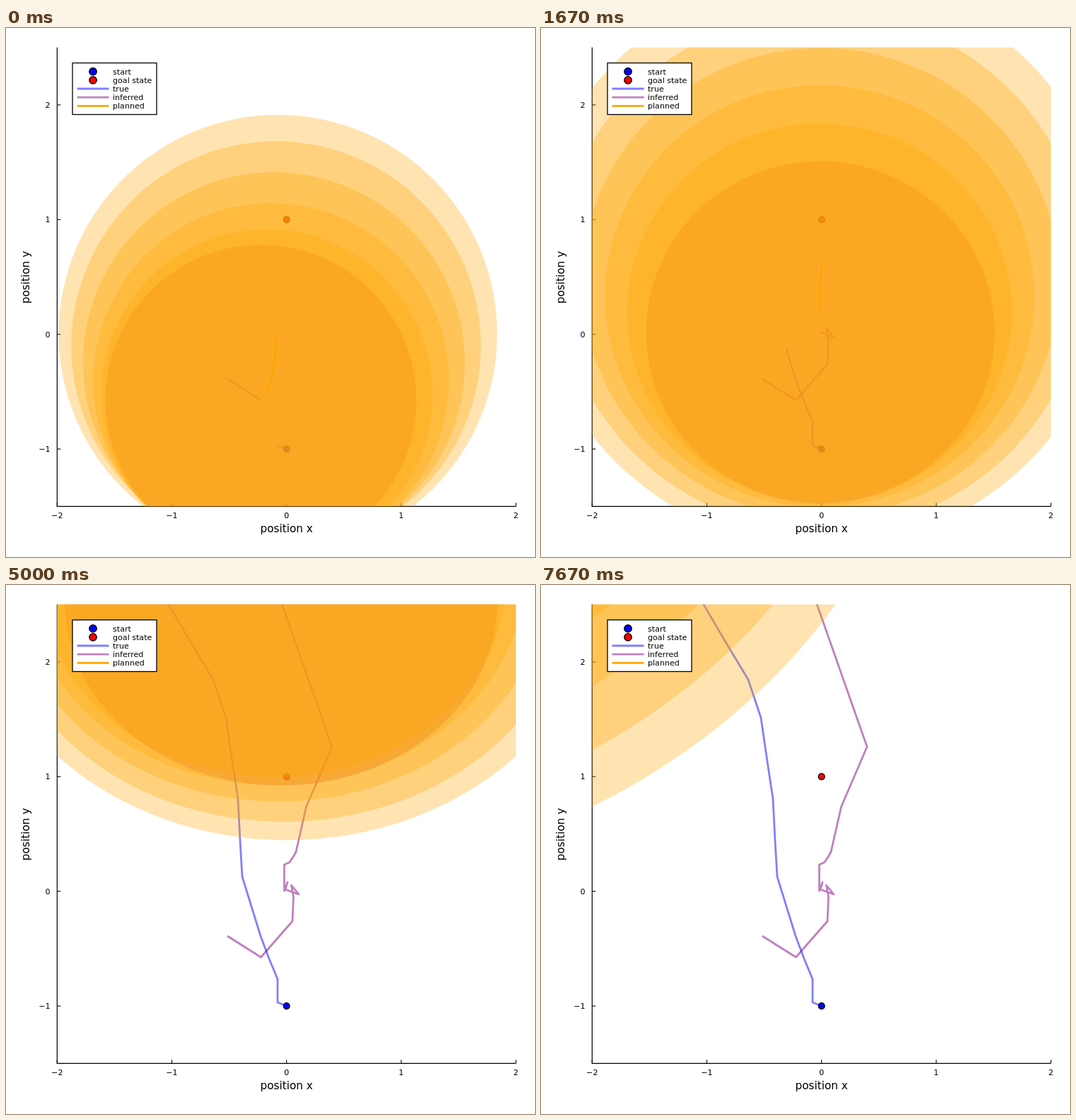
An HTML page with a canvas that plays this animation: 748 by 749 pixels, repeating every 8 s.

```html
<!DOCTYPE html>
<html>
<head>
<meta charset="utf-8">
<style>
html, body { margin: 0; width: 100%; height: 100%; overflow: hidden; background: #fff; }
canvas { display: block; }
</style>
</head>
<body>
<canvas id="stage" width="748" height="749"></canvas>
<script>
const ctx = document.getElementById('stage').getContext('2d');
const LEFT = 72.3, TOP = 27.5, RIGHT = 721, BOTTOM = 677.3;
const SMALL = 11.1, LARGE = 15.28, STEPS = 24, HORIZON = 5;
const BLUE = 'rgba(0,0,255,.5)', PURPLE = 'rgba(128,0,128,.5)', ORANGE = 'rgb(255,165,0)';
const px = x => 396.7 + 162.2 * x;
const py = y => 433.7 - 162.4 * y;
const mix = (a, b, u) => a + (b - a) * u;

const truePath = [
  [397, 596], [384, 591], [384, 578], [384, 558], [372, 529], [360, 497],
  [347, 455], [334, 413], [331, 362], [328, 303], [320, 250], [311, 188],
  [293, 134], [260, 79], [229, 26]
];
const inferredPath = [
  [313, 497], [360.5, 527], [405, 476], [406.5, 442], [403.5, 425], [414, 438],
  [395, 431], [398, 421], [395, 429], [393.5, 433], [393.5, 396], [401, 392.5],
  [406, 385], [410, 378], [424.5, 314], [461, 229], [389, 24], [235, -150], [110, -272]
];
// past its last point the inferred path drifts away at a steady speed
for (let i = inferredPath.length; i <= STEPS; i++) {
  const [x, y] = inferredPath[i - 1];
  inferredPath.push([x - 102, y - 48]);
}

// turning points of the plan: where it ends, its first heading, smallest and largest radius
const plans = [
  { step: 0, end: [384.5, 433], heading: [17, 0], radius: [220, 310] },
  { step: 3, end: [399, 329], heading: [-6, -57], radius: [209.5, 357] },
  { step: 8, end: [395, 334], heading: [0, -43], radius: [302, 490] },
  { step: 12, end: [402, 310], heading: [-2, -44], radius: [386, 556] },
  { step: 14, end: [400, 215], heading: [-20, -60], radius: [345, 520] },
  { step: 15, end: [397, -17], heading: [-28, -70], radius: [306, 445] },
  { step: 17, end: [125, -225], heading: [-25, -70], radius: [452, 535] },
  { step: 20, end: [-171, -386], heading: [0, 0], radius: [600, 767] },
  { step: 23, end: [-450, -377], heading: [15, 54], radius: [780, 1000] }
];

function planAt(step) {
  const i = plans.findLastIndex(p => p.step <= step);
  const a = plans[i], b = plans[i + 1] || a;
  const u = (step - a.step) / (b.step - a.step || 1);
  const blend = key => a[key].map((v, k) => mix(v, b[key][k], u));
  return { end: blend('end'), heading: blend('heading'), radius: blend('radius') };
}

// ring 0 is the inferred state, the others lie along a cubic curve to the plan's end
function ringsAt(step) {
  const { end, heading, radius } = planAt(step);
  const start = inferredPath[step + 1];
  const ratio = Math.max(.81, 1 - .15 * (step / 15) ** 2);
  return Array.from({ length: HORIZON + 1 }, (_, n) => {
    const t = n / HORIZON, s = 1 - t;
    const along = k => start[k] + 3 * s * s * t * heading[k]
      + (3 * s * t * t * .8 + t ** 3) * (end[k] - start[k]);
    const r = mix(radius[0], radius[1], t ** 1.15);
    return { x: along(0), y: along(1), rx: r, ry: r * ratio };
  });
}

function line(points, color, width = 2.78) {
  ctx.beginPath();
  points.forEach(p => ctx.lineTo(p[0], p[1]));
  ctx.strokeStyle = color;
  ctx.lineWidth = width;
  ctx.stroke();
}

function dot(x, y, r, color) {
  ctx.beginPath();
  ctx.arc(x, y, r, 0, 7);
  ctx.fillStyle = color;
  ctx.fill();
  ctx.strokeStyle = '#000';
  ctx.lineWidth = 1.4;
  ctx.stroke();
}

function text(str, x, y, size, align) {
  ctx.font = size + 'px "DejaVu Sans", sans-serif';
  ctx.textAlign = align;
  ctx.fillStyle = '#000';
  ctx.fillText(str, x, y);
}

function axes() {
  line([[LEFT, TOP], [LEFT, BOTTOM], [RIGHT, BOTTOM]], '#000', 1.2);
  for (let v = -2; v <= 2; v++) {
    const label = String(v).replace('-', '\u2212');
    line([[px(v), BOTTOM], [px(v), BOTTOM - 5]], '#000', 1.1);
    text(label, px(v), 694, SMALL, 'center');
    if (v < -1) continue;
    line([[LEFT, py(v)], [LEFT + 5, py(v)]], '#000', 1.1);
    text(label, 62.5, py(v) + 4, SMALL, 'right');
  }
  text('position x', 396.7, 714, LARGE, 'center');
  ctx.save();
  ctx.translate(33, 353);
  ctx.rotate(-Math.PI / 2);
  text('position y', 0, 0, LARGE, 'center');
  ctx.restore();
}

function legend() {
  ctx.fillStyle = '#fff';
  ctx.fillRect(94, 49.5, 119, 73);
  ctx.strokeStyle = '#000';
  ctx.lineWidth = 1.3;
  ctx.strokeRect(94, 49.5, 119, 73);
  const row = i => 61.7 + 12.15 * i;
  ['#00f', '#f00'].forEach((c, i) => dot(123, row(i), 5.2, c));
  [BLUE, PURPLE, ORANGE].forEach((c, i) =>
    line([[100.5, row(i + 2)], [145.5, row(i + 2)]], c));
  ['start', 'goal state', 'true', 'inferred', 'planned'].forEach((s, i) =>
    text(s, 151, row(i) + 4, SMALL, 'left'));
}

function draw(now) {
  // a small lead keeps rounded frame times on the right side of each step
  const step = Math.floor((now % 8000 + 4) * STEPS / 8000) % STEPS;
  const rings = ringsAt(step);
  ctx.fillStyle = '#fff';
  ctx.fillRect(0, 0, 748, 749);
  ctx.lineJoin = 'miter';
  axes();

  ctx.save();
  ctx.beginPath();
  ctx.rect(LEFT, TOP, RIGHT - LEFT, BOTTOM - TOP);
  ctx.clip();
  ctx.lineJoin = 'round';
  dot(px(0), py(-1), 4.4, '#00f');
  dot(px(0), py(1), 4.4, '#f00');
  line(truePath.slice(0, step + 2), BLUE);
  line(inferredPath.slice(0, step + 2), PURPLE);
  rings.forEach((r, n) => {
    ctx.beginPath();
    ctx.ellipse(r.x, r.y, r.rx, r.ry, 0, 0, 2 * Math.PI);
    ctx.fillStyle = n ? 'rgba(255,165,0,.3)' : 'rgba(128,0,128,.3)';
    ctx.fill();
  });
  line(rings.slice(1).map(r => [r.x, r.y]), ORANGE);
  ctx.restore();

  legend();
  requestAnimationFrame(draw);
}
requestAnimationFrame(draw);
</script>
</body>
</html>
```
